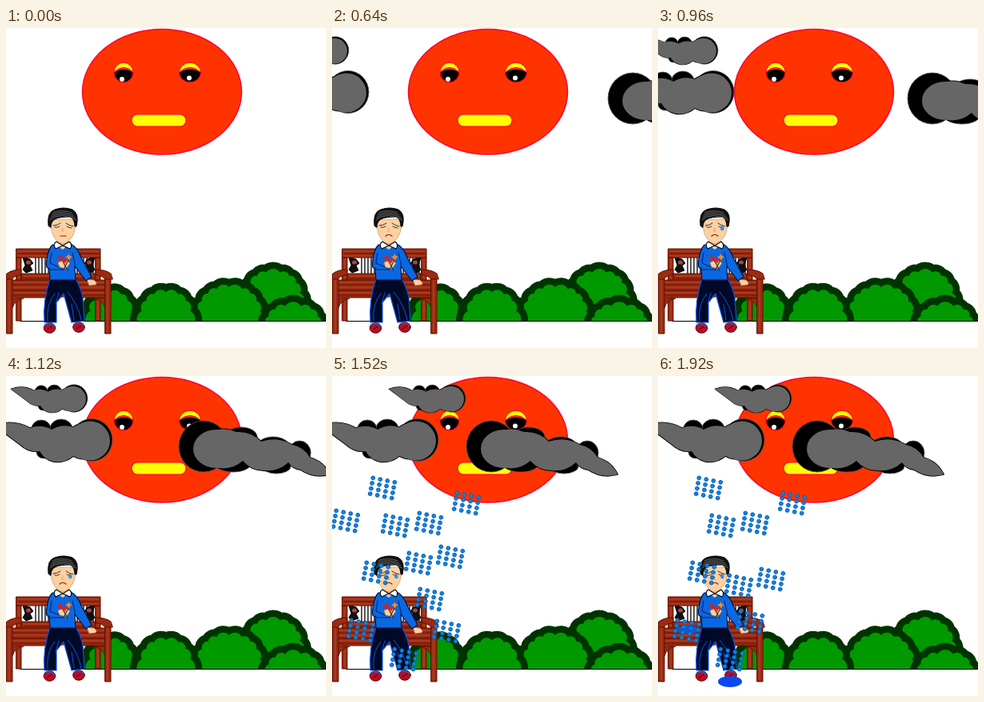
Write an HTML page with a canvas that moves like this. It is 400x400 px and loops after 2000 ms.

```html
<!DOCTYPE html>
<html>
<head>
<meta charset="utf-8">
<style>
html, body { margin: 0; width: 100%; height: 100%; overflow: hidden; background: #fff; }
canvas { display: block; width: 100vw; height: 100vh; }
</style>
</head>
<body>
<canvas width="400" height="400"></canvas>
<script>
const canvas = document.querySelector('canvas');
const ctx = canvas.getContext('2d');
ctx.lineCap = ctx.lineJoin = 'round';

const WOOD = '#9c2a10', DARK_WOOD = '#5c1000', GRAIN = '#bd5236';
const SKIN = '#fcd0a1', NAVY = '#000a26', SHIRT = '#0b68e0';

function draw(path, fill, stroke, width = 1) {
  const p = typeof path === 'string' ? new Path2D(path) : path;
  if (fill) { ctx.fillStyle = fill; ctx.fill(p); }
  if (stroke) { ctx.strokeStyle = stroke; ctx.lineWidth = width; ctx.stroke(p); }
}

function oval(x, y, rx, ry, fill, stroke, width) {
  const p = new Path2D();
  p.ellipse(x, y, rx, ry, 0, 0, 7);
  draw(p, fill, stroke, width);
}

// Outline that bulges outward between clockwise points
function scallop(points, roundness) {
  return points.reduce((d, [x, y], i) => {
    if (!i) return `M${x} ${y}`;
    const r = Math.hypot(x - points[i - 1][0], y - points[i - 1][1]) * roundness;
    return `${d}A${r} ${r} 0 0 1 ${x} ${y}`;
  }, '') + 'Z';
}

// Piecewise linear value through [step, value] pairs
function track(k, keys) {
  const i = keys.findIndex(key => k <= key[0]);
  if (i < 0) return keys[keys.length - 1][1];
  if (!i) return keys[0][1];
  const [k0, v0] = keys[i - 1], [k1, v1] = keys[i];
  return v0 + (v1 - v0) * (k - k0) / (k1 - k0);
}

function eye(x, r, px, py) {
  const lid = dip => `M${x - r} 55.5A${r} 12.3 0 0 1 ${x + r} 55.5Q${x} ${dip} ${x - r} 55.5Z`;
  oval(x, 55.5, r, 12.3, '#000', '#f03');
  draw(lid(48), '#f30');
  draw(lid(43), '#ff0', '#f03');
  oval(px, py, 3, 3, '#fff');
}

function sun() {
  oval(195, 79.8, 99.5, 78.3, '#f30', '#f03', 1.5);
  eye(147, 12, 145, 64);
  eye(230, 13.5, 229, 62.5);
  const mouth = new Path2D();
  mouth.roundRect(157, 108, 68, 15, 7);
  draw(mouth, '#ff0', '#f03', 1.2);
}

function bush(cx, rx, top, base = 374) {
  const bumps = Math.round((rx + base - top) / 9);
  const points = Array.from({ length: bumps + 1 }, (_, i) => {
    const c = Math.cos(Math.PI * i / bumps), s = Math.sin(Math.PI * i / bumps);
    return [cx - rx * Math.sign(c) * Math.abs(c) ** .8, base - (base - top) * s ** .8];
  });
  const d = scallop(points, .6);
  draw(d, '#030', '#030', 17);
  draw(d, '#090');
}

function bushes() {
  ctx.save();
  ctx.beginPath();
  ctx.rect(0, 280, 400, 87);
  ctx.clip();
  bush(334, 35, 305, 350);
  bush(131, 27, 330);
  bush(279, 40, 324);
  bush(200, 32, 330);
  bush(359, 33, 347);
  ctx.restore();
  draw('M18 366.5H400', null, '#000');
}

function plank(x, y, w, h) {
  draw(`M${x} ${y}h${w}v${h}h${-w}Z`, WOOD, DARK_WOOD);
  const grain = w > h ? i => `M${x + 2} ${y + i}h${w - 4}` : i => `M${x + i} ${y + 2}v${h - 4}`;
  for (let i = 3; i < Math.min(w, h) - 1; i += 3) draw(grain(i), null, i % 2 ? GRAIN : DARK_WOOD, .8);
}

function bench() {
  draw('M20 287H111V307H20Z', '#fff');
  for (let x = 37; x < 110; x += 4) draw(`M${x} 287V307`, null, '#111', 1.4);
  for (const [x, s] of [[28, 1], [104, -1]]) {
    draw(`M${x - 7 * s} 286l${9 * s} 3 ${4 * s} 5 ${-4 * s} 3 ${3 * s} 6 ${-8 * s} 3 ${-4 * s} -4 ${3 * s} -5Z`, '#111', '#000');
    oval(x, 293, 3, 2.5, '#a44');
  }
  plank(13, 276, 105, 11);
  plank(20, 307, 91, 9);
  plank(5, 315, 121, 13);
  plank(4, 328, 124, 9);
  for (const x of [13, 112]) {
    plank(x, 287, 6, 28);
    plank(x, 338, 6, 28);
  }
  draw('M8 338H22Q10 341 8 350ZM124 338H110Q122 341 124 350Z', WOOD, DARK_WOOD);
  plank(1, 311, 7, 71);
  plank(124, 311, 7, 71);
  draw('M1 307Q7 302 19 302V308Q10 310 7 314H0ZM131 307Q125 302 112 302V308Q121 310 124 314H133Z', WOOD, DARK_WOOD);
}

function shoe(x, y) {
  oval(x, y, 7.3, 6.3, '#c00a24', '#500');
  draw(`M${x - 6} ${y - 4}Q${x} ${y - 8} ${x + 6} ${y - 2}`, null, '#16c', 1.5);
  draw(`M${x - 3} ${y + 2}l6 -4`, null, '#111');
}

function petal(x, y, color) {
  draw(`M${x - 4} ${y}l3 -1 1 -3 2 3 3 1 -3 2 -1 3 -2 -3Z`, color);
}

function legs() {
  draw('M62 338L63 367H82L75 336Z', '#fff');
  draw('M55 314H87Q93 323 96 337L98 366 82 368 72 332 63 343 63 368 48 368Q46 340 55 314Z', NAVY, '#0a50e8', 1.2);
  draw('M61 332Q50 345 52 366M66 331L62 345M77 330Q90 345 94 365M82 345L85 365', null, '#0a50e8');
  shoe(54.5, 375);
  shoe(91, 374);
}

function torso() {
  draw('M101 314L110 315Q115 319 112 321L104 322Z', SKIN, '#a64', .8);
  draw('M58 271H83Q90 276 94 287L107 311 100 316 86 298 87 315H55L54 300Q49 302 51 289Q53 276 58 271Z', SHIRT, '#001540', 1.2);
  draw('M83 281L87 299M57 281L55 294 69 300M55 302H72', null, '#001c70');
  draw('M65 293L75 289 80 294 75 301 67 299Z', SKIN, '#a64', .8);
  draw('M70 290L77 303M79 288L72 302', null, '#333', 1.2);
  petal(67, 287, '#e21b16');
  petal(73, 290, '#d22');
  petal(78, 286, '#f58a1c');
}

function head(k) {
  draw('M65 262H77V272L71 277 64 272Z', SKIN);
  draw('M63 267Q58 270 62 276L71 272ZM79 267Q84 271 80 276L71 272Z', '#fff', '#000', 1.1);
  draw('M56 240Q53 243 57 252Q58 261 65 267Q71 272 77 267Q85 261 86 251Q89 243 86 239Z', SKIN, '#c8925e', .7);
  draw('M53 247Q51 230 61 227Q72 223 83 227Q92 232 88 248H86Q86 240 81 236Q66 236 61 239Q56 242 56 249Z', '#111', '#000');
  for (let i = 0; i < 4; i++) draw(`M${55 + i} ${240 - 3 * i}Q${66 + i} ${229 - i} ${88 - 2 * i} ${240 - 3 * i}`, null, '#888', .7);
  draw('M59 247Q64 247 68 244M75 244Q79 247 84 248M61 249Q65 250 67 248M76 248Q79 250 82 250', null, '#222', .9);
  draw('M71 250L70 254H72', null, '#c8925e', .7);
  draw(k < 2 ? 'M68 260H75' : 'M67 260Q71 256.5 75 260', null, '#722', 1.2);
  if (k > 5) draw('M80 247Q77 252 80 253Q84 253 80 247Z', '#39f', '#06c', .6);
}

// Each cloud: dark puffs behind, then a grey round head with a tapering tail
const leftCloud = {
  puffs: [[107, 80, 26, 26.5], [69, 66, 14, 12], [44, 66, 12, 11], [47, 95, 9, 8]],
  head: [105, 81, 25, 24.5],
  tail: [[-14, 62], [30, 65], [57, 67], [84, 64], [105, 60], [105, 102], [84, 100], [60, 107], [42, 94], [18, 86]]
};
const rightCloud = {
  puffs: [[31, 88, 31, 32], [78, 76, 20, 12], [118, 88, 20, 12], [151, 96, 14, 15], [68, 110, 22, 10], [122, 113, 18, 9]],
  head: [47, 91, 29, 24],
  tail: [[40, 70], [72, 70], [103, 82], [142, 86], [164, 102], [189, 123], [152, 117], [137, 108], [106, 118], [80, 106], [50, 115]]
};

function cloud({ puffs, head, tail }, x, y = 0, scale = 1) {
  const d = scallop(tail, 1.2);
  ctx.save();
  ctx.translate(x, y);
  ctx.scale(scale, scale);
  for (const puff of puffs) oval(...puff, '#000', '#555', .8);
  draw(d, '#666', '#000', 1.8);
  oval(...head, '#666');
  draw(d, '#666');
  ctx.restore();
}

function clouds(k) {
  if (!k) return;
  cloud(leftCloud, track(k, [[0, -136], [8, -38], [10, 0]]));
  cloud(leftCloud, track(k, [[0, -119.5], [10, 15.5], [13, 80.5]]), -24, .65);
  cloud(rightCloud, track(k, [[0, 400], [4, 345], [8, 312], [10, 216], [13, 168]]));
}

function drops(x, y) {
  for (let i = 0; i < 16; i++) {
    const col = i % 4 - 1.5, row = (i >> 2) - 1.5;
    oval(x + 9 * col - 1.2 * row, y + 1.8 * col + 6.6 * row, 2.4, 2.4, '#1584e0', '#0560b8');
  }
}

const drizzle = [[93, 143], [172, 155], [125, 173], [81, 191], [149, 203], [103, 229], [60, 249], [110, 291]];
const shower = [[63, 140], [168, 159], [79, 187], [121, 184], [55, 246], [148, 226], [108, 234], [122, 279], [36, 318], [90, 354], [17, 181], [143, 319]];

function rain(k) {
  if (k < 15) {
    drizzle.slice(0, Math.max(0, 3 * (k - 10))).forEach(p => drops(...p));
    return;
  }
  const f = (k - 15) / 5;
  oval(90, 382, 15 * f, 7 * f, '#0a48f0');
  oval(37, 317, 15 * f, 5 * f, '#0a5cdc');
  // Showers right of the boy keep sinking; the outermost two run dry
  for (const [x, y] of shower.slice(0, k < 18 ? 12 : 10)) {
    const sink = x > 100 && y > 220 && y < 300 ? f : 0;
    drops(x - 7 * sink, y + 28 * sink);
  }
}

function frame(now) {
  const t = now % 2000;
  const k = t < 400 ? 0 : Math.floor((t - 400) / 80) + 1;
  ctx.fillStyle = '#fff';
  ctx.fillRect(0, 0, 400, 400);
  sun();
  bushes();
  bench();
  legs();
  torso();
  head(k);
  clouds(k);
  rain(k);
  requestAnimationFrame(frame);
}
frame(performance.now());
</script>
</body>
</html>
```
